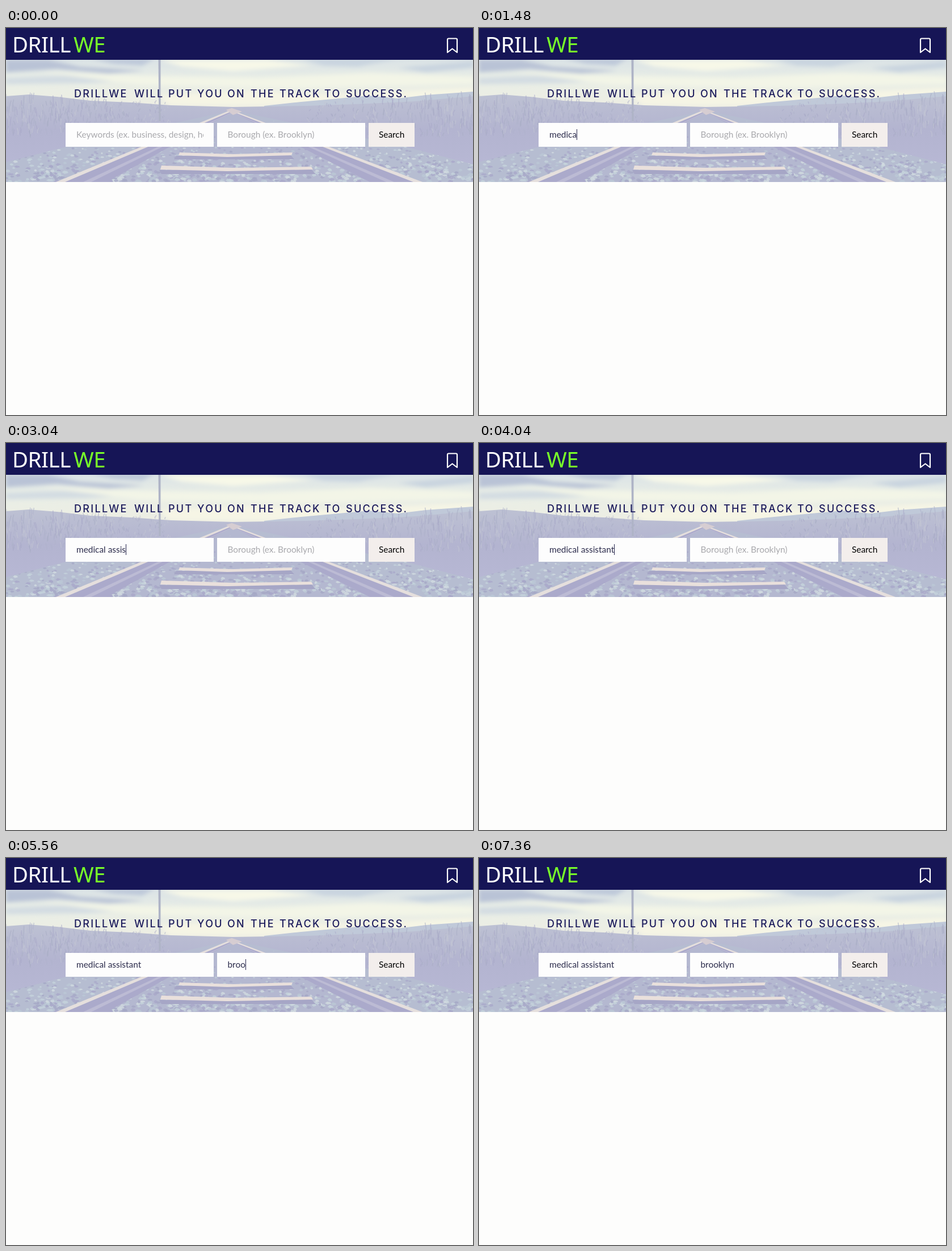
These frames come from a looping animation (823x681 px, 7400 ms). An HTML page:

```html
<!DOCTYPE html>
<html lang="en">
<head>
<meta charset="utf-8">
<title>Training search</title>
<style>
  html, body { margin: 0; width: 100%; height: 100%; overflow: hidden; background: #fdfdfc; }
  svg { display: block; }
  .logo { font: 500 38.5px "Noto Sans", "Open Sans", sans-serif; letter-spacing: -.5px; }
  .headline { font: 500 18px Inter, sans-serif; letter-spacing: 2.3px; fill: #1c1b5c; }
  .field { font: 15.4px Lato, sans-serif; }
</style>
</head>
<body>
<svg width="823" height="681" viewBox="0 0 823 681">
  <defs>
    <linearGradient id="sky" x2="0" y2="1">
      <stop offset="0" stop-color="#dbe3e6"/>
      <stop offset=".4" stop-color="#e9eee6"/>
      <stop offset="1" stop-color="#eeeee3"/>
    </linearGradient>
    <linearGradient id="land" x2="0" y2="1">
      <stop offset="0" stop-color="#bdc1d3"/>
      <stop offset=".4" stop-color="#b3b4d0"/>
      <stop offset="1" stop-color="#b9b9d6"/>
    </linearGradient>
    <filter id="soft" x="-20%" y="-60%" width="140%" height="220%"><feGaussianBlur stdDeviation="3.5"/></filter>
    <filter id="slight"><feGaussianBlur stdDeviation=".6"/></filter>
    <clipPath id="hero"><rect y="56" width="823" height="215"/></clipPath>
    <clipPath id="keywordsBox"><rect x="124" y="168" width="224" height="40"/></clipPath>
    <clipPath id="ballast"><path d="M0 236L110 208L395 146L90 271H0zM823 240L700 208L404 146L732 271H823zM390 152L175 271H640L410 152z"/></clipPath>
  </defs>

  <rect width="823" height="681" fill="#fdfdfc"/>

  <g clip-path="url(#hero)">
    <rect y="56" width="823" height="90" fill="url(#sky)"/>
    <g filter="url(#soft)">
      <path d="M0 56H75L130 68L245 75L180 80L90 72L0 78z" fill="#b9c3d6"/>
      <path d="M150 54H262L240 66L190 63z" fill="#bdc8d9"/>
      <path d="M270 56H460L540 66L400 76L310 68z" fill="#f7f8e8"/>
      <path d="M520 54H690L620 68L560 66zM690 70L823 58V70L740 78z" fill="#c9d4df"/>
      <path d="M0 88L120 83L240 90L140 97L0 99z" fill="#d3dce2"/>
      <path d="M60 78L220 84L450 88L640 79L823 86V98L500 106L240 100z" fill="#f3f5e7"/>
      <path d="M270 119L430 110L570 118L823 105V118L520 136H290z" fill="#f6f5e5"/>
    </g>
    <path d="M455 137L520 130L575 125L640 119L690 124L740 118L823 112V150H455z" fill="#c0c9d9" filter="url(#slight)"/>
    <path d="M0 120L40 117L90 121L150 128L220 131L290 136L400 139L530 137L640 133L720 129L823 120V271H0z" fill="url(#land)"/>
    <g id="grass" fill="none" stroke-width="1.5"/>
    <path d="M268.5 56h4v108h-3z" fill="#aeb3c6"/>
    <g filter="url(#slight)">
      <path d="M0 236L110 208L395 146L90 271H0zM823 240L700 208L404 146L732 271H823z" fill="#b6bdd1"/>
      <path d="M390 152L175 271H640L410 152z" fill="#b4b8d0"/>
      <g id="stones" clip-path="url(#ballast)"/>
      <path d="M390 147L96 271H178L396 149z" fill="#abaacb"/>
      <path d="M405 147L726 271H641L401 149z" fill="#abaacb"/>
      <path d="M394 150L136 271H150L396 150zM404 150L684 271H670L402 150z" fill="#bcbbd4"/>
      <path d="M392 146L88 271H104L397 147zM402 146L734 271H718L401 148z" fill="#e5dfdd"/>
      <path d="M300 225L502 224L508 231H296zM270 250L538 249L546 257H274z" fill="#a6a6c6"/>
      <path d="M306 219L400 222L505 219L503 224L390 227L304 224zM274 242L400 246L538 244L541 249L390 252L272 249z" fill="#e9e0dc"/>
      <path d="M388 144L398 141L416 147L400 153z" fill="#d6cdd2"/>
    </g>
  </g>

  <rect width="823" height="56" fill="#161556"/>
  <text class="logo" y="43"><tspan x="11" fill="#fff">DRILL</tspan><tspan x="119" fill="#78ff29">WE</tspan></text>
  <path d="M780 18.5h13q2 0 2 2V43l-8.5-6.5L778 43V20.5q0-2 2-2z" fill="none" stroke="#fff" stroke-width="2.2" stroke-linejoin="round"/>
  <text class="headline" id="headline" y="122"></text>

  <path d="M105 167h261v42h-261zM372 167h261v42h-261z" fill="#fdfdfd"/>
  <rect x="639" y="167" width="81" height="42" fill="#f3eeec"/>
  <g class="field">
    <g clip-path="url(#keywordsBox)"><text id="keywords" x="124" y="193"></text></g>
    <text id="borough" x="390.5" y="193"></text>
    <text x="657" y="193" fill="#000">Search</text>
  </g>
  <rect id="caret" y="178" width="1" height="19" fill="#25254d"/>
</svg>

<script>
const LOOP = 7400, KEY = 225, BLINK = 500;
const byId = id => document.getElementById(id);

const fields = [
  { node: byId('keywords'), x: 124, hint: 'Keywords (ex. business, design, health)', value: 'medical assistant', focus: 120, start: 170 },
  { node: byId('borough'), x: 390.5, hint: 'Borough (ex. Brooklyn)', value: 'brooklyn', focus: 4300, start: 4800 }
];
const caret = byId('caret');

function add(parent, tag, attrs, text = '') {
  const node = document.createElementNS('http://www.w3.org/2000/svg', tag);
  for (const key in attrs) node.setAttribute(key, attrs[key]);
  node.textContent = text;
  parent.append(node);
}

let seed = 71;
const random = () => (seed = seed * 16807 % 2147483647) / 2147483647;
const between = (low, high) => low + (high - low) * random();
const pick = list => list[Math.floor(random() * list.length)];

function drawScenery() {
  // Grass is tall at the sides and fades towards the track.
  for (let i = 0; i < 620; i++) {
    const reach = Math.pow(random(), 1.15) * 290;
    const x = random() < .5 ? reach : 823 - reach;
    const depth = random();
    const y = 132 + depth * 62;
    const height = (1 - reach / 310) * between(8, 25) * (1 - depth * .55) + 2;
    add(byId('grass'), 'path', {
      d: `M${x} ${y}q${between(-2, 2)} ${-height / 2} ${between(-3, 3)} ${-height}`,
      stroke: pick(['#a8adc5', '#afb2cb', '#c3c7d4', '#a8a9c8']), opacity: .6
    });
  }
  for (let i = 0; i < 1300; i++) {
    const y = 150 + Math.sqrt(random()) * 121;
    const size = (y - 140) / 32;
    const x = between(0, 823), w = size * between(.7, 1.6), h = size * between(.5, .9);
    add(byId('stones'), 'path', {
      d: `M${x - w} ${y}l${w * .7} ${-h}l${w} ${h * .4}l${w * .3} ${h}l${-w * 1.2} ${h * .5}z`,
      fill: pick(['#c6d4dc', '#d2dce1', '#bcc8d6', '#a5a8c6', '#a9a8ca']), opacity: .8
    });
  }
}

function drawHeadline() {
  const words = 'DRILLWE WILL PUT YOU ON THE TRACK TO SUCCESS.'.split(' ');
  const starts = [120, 226, 286, 337, 390, 431, 482, 561, 599];
  words.forEach((word, i) => add(byId('headline'), 'tspan', { x: starts[i] }, word));
}

function render(time) {
  const active = fields.filter(field => time >= field.focus).pop();
  for (const field of fields) {
    const count = Math.floor((time - field.start) / KEY) + 1;
    field.typed = field.value.slice(0, Math.max(0, count));
    field.node.textContent = field.typed || field.hint;
    field.node.setAttribute('fill', field.typed ? '#2c2c4c' : '#a9a9ad');
  }
  caret.style.display = 'none';
  if (!active) return;
  // Each key press restarts the blink.
  const lastKey = active.start + (active.typed.length - 1) * KEY;
  const idle = time - (active.typed ? lastKey : active.focus);
  if (idle % (2 * BLINK) >= BLINK) return;
  const width = active.typed ? active.node.getComputedTextLength() : 0;
  caret.setAttribute('x', Math.round(active.x + width));
  caret.style.display = '';
}

drawScenery();
drawHeadline();
const began = performance.now();
function tick() {
  render((performance.now() - began) % LOOP);
  requestAnimationFrame(tick);
}
tick();
</script>
</body>
</html>
```
